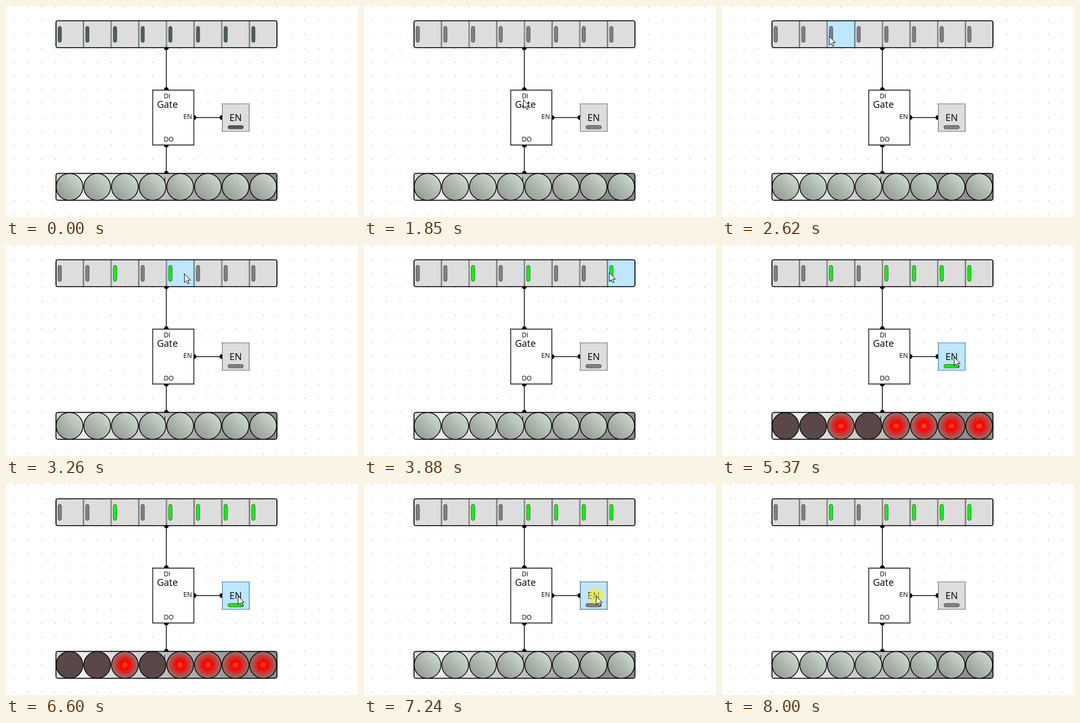
An HTML page with a canvas that plays this animation: 668 px wide and 400 px high, repeating every 8.56 s.

```html
<!DOCTYPE html>
<html lang="en">
<head>
<meta charset="utf-8">
<title>Gate with enable input</title>
<style>
html, body { margin: 0; overflow: hidden; background: #fff; }
canvas { display: block; }
</style>
</head>
<body>
<canvas id="stage" width="668" height="400"></canvas>
<script>
const ctx = document.getElementById('stage').getContext('2d');
const LOOP = 8560, ENTER = 1460, LEAVE = 8000, STEP = 78, HOLD = 60;
const GRID = 26.25, PITCH = 2 * GRID, BAR_X = 94.5, EN = 8;

// Pointer stops: arrival, departure, x, y
const stops = [
  [ENTER, ENTER, 535, 272], [1620, 1620, 165, 141], [2003, 2003, 393, 201],
  [2540, 2720, 203, 57], [2875, 2875, 268, 85], [3030, 3300, 338, 54],
  [3490, 3728, 488, 56], [3960, 4190, 453, 50], [4430, 4690, 383, 49],
  [4890, 7840, 439.5, 212], [7920, LEAVE, 463, 238]
];
const presses = [2650, 3200, 3585, 4045, 4615, 5145, 6625, 7240, 7640];

function pointerAt(t) {
  if (t < ENTER || t >= LEAVE) return null;
  const s = t - (t - ENTER) % STEP;
  const i = stops.findLastIndex(p => p[0] <= s);
  const [, leave, x, y] = stops[i];
  const [arrive, , nx, ny] = stops[i + 1] || stops[i];
  const k = s > leave ? (s - leave) / (arrive - leave) : 0;
  return { x: Math.round(x + k * (nx - x)), y: Math.round(y + k * (ny - y)) };
}

function buttonUnder(p) {
  if (!p) return -1;
  if (p.y >= 28 && p.y < 79 && p.x > 95 && p.x < 514) return Math.floor((p.x - BAR_X) / PITCH);
  return p.x >= 410 && p.x < 462 && p.y >= 185 && p.y < 238 ? EN : -1;
}

const clicks = presses.map(at => ({ at, button: buttonUnder(pointerAt(at)) }));

function box(x, y, w, h, r, fill, stroke, width = 1) {
  ctx.beginPath();
  ctx.roundRect(x, y, w, h, r);
  if (fill) { ctx.fillStyle = fill; ctx.fill(); }
  if (stroke) { ctx.strokeStyle = stroke; ctx.lineWidth = width; ctx.stroke(); }
}

function disc(x, y, r, fill, stroke) {
  ctx.beginPath();
  ctx.arc(x, y, r, 0, 2 * Math.PI);
  ctx.fillStyle = fill;
  ctx.fill();
  if (stroke) { ctx.strokeStyle = stroke; ctx.lineWidth = 1.5; ctx.stroke(); }
}

function line(x0, y0, x1, y1, width = 1.5) {
  ctx.beginPath();
  ctx.moveTo(x0, y0);
  ctx.lineTo(x1, y1);
  ctx.strokeStyle = '#000';
  ctx.lineWidth = width;
  ctx.stroke();
}

function wire(x0, y0, x1, y1) {
  line(x0, y0, x1, y1);
  disc(x0, y0, 4.4, '#000');
  disc(x1, y1, 4.4, '#000');
}

function text(s, x, y, size) {
  ctx.font = size + 'px "Open Sans", "Noto Sans", sans-serif';
  ctx.fillStyle = '#000';
  ctx.fillText(s, x, y);
}

function blend(gradient, ...stops) {
  stops.forEach(([at, color]) => gradient.addColorStop(at, color));
  return gradient;
}

function grid() {
  ctx.fillStyle = '#555';
  for (let x = 15.25; x < 668; x += GRID)
    for (let y = 1; y < 400; y += GRID)
      ctx.fillRect(x, y, 1, 1);
}

function buttonColors(i, hot, pressed) {
  if (i !== hot) return ['#ddd', '#707070'];
  return pressed ? ['#c4e5f6', '#2c628b'] : ['#bee6fd', '#3c7fb1'];
}

function led(x, y, w, h, on, idle) {
  box(x, y, w, h, 3.5, idle ? '#4a6050' : on ? '#0cf80c' : '#808080', '#555');
}

function switches(isOn, hot, pressed, idle) {
  for (let i = 0; i < 8; i++) {
    const x = BAR_X + i * PITCH;
    const [fill, edge] = buttonColors(i, hot, pressed);
    box(x + .7, 28.5, PITCH - 1.4, 50, 1, fill, edge, 1.2);
    led(x + 4.2, 38.5, 6.5, 30.5, isOn(i), idle);
  }
  box(BAR_X + .3, 28, 419.5, 51, 4, null, '#000', 1.7);
}

function lamps(enabled, isOn) {
  const metal = blend(ctx.createLinearGradient(95, 317, 514, 369),
    [0, '#d4d4d4'], [.12, '#eee'], [.85, '#909090'], [1, '#8c8c8c']);
  box(BAR_X + .3, 317.4, 419.5, 51, 4, metal, '#000', 1.7);
  line(301.5, 324, 301.5, 334, 1);
  for (let i = 0; i < 8; i++) {
    const x = BAR_X + (i + .5) * PITCH - .2, y = 343;
    let fill = '#5a4848';
    if (!enabled)
      fill = blend(ctx.createLinearGradient(x + 18, y - 18, x - 18, y + 18), [0, '#c8d8c8'], [1, '#969c96']);
    else if (isOn(i))
      fill = blend(ctx.createRadialGradient(x, y, 0, x, y, 26),
        [0, '#ff4a18'], [.16, '#ff4014'], [.21, '#ff0808'], [.32, '#fa0404'], [1, '#8a7a74']);
    disc(x, y, 25.4, fill, '#000');
  }
}

function gate() {
  box(278.5, 159.5, 78, 104, 0, '#fff', '#000', 1.4);
  text('DI', 299.5, 175, 12.5);
  text('Gate', 286.5, 193, 18);
  text('EN', 336.5, 214, 12.5);
  text('DO', 299.5, 257, 12.5);
}

function enableButton(on, hot, pressed, idle) {
  const [fill, edge] = buttonColors(EN, hot, pressed);
  box(410.5, 185.5, 51, 52, 0, fill, edge, 1.2);
  text('EN', 424, 218, 18);
  led(421, 226.5, 29.5, 6.5, on, idle);
}

const arrowShape = new Path2D('M0 0V16.5L3.8 13L6.6 19L9 18L6.4 12H11.6Z');
function arrow({ x, y }) {
  ctx.save();
  ctx.translate(x + .5, y + .5);
  ctx.fillStyle = '#fff';
  ctx.fill(arrowShape);
  ctx.strokeStyle = '#000';
  ctx.lineWidth = 1;
  ctx.stroke(arrowShape);
  ctx.restore();
}

function draw(t) {
  const isOn = i => clicks.filter(c => c.button === i && t >= c.at + HOLD).length % 2 === 1;
  const pressed = clicks.some(c => t >= c.at && t < c.at + HOLD);
  const pointer = pointerAt(t), hot = buttonUnder(pointer), idle = t < 1160;
  ctx.fillStyle = '#fff';
  ctx.fillRect(0, 0, 668, 400);
  grid();
  wire(304.3, 79.5, 304.3, 158.5);
  wire(304.3, 264, 304.3, 317);
  wire(357, 211.5, 409.5, 211.5);
  switches(isOn, hot, pressed, idle);
  gate();
  enableButton(isOn(EN), hot, pressed, idle);
  lamps(isOn(EN), isOn);
  if (pressed) disc(pointer.x, pointer.y + 1, 14.5, 'rgba(250,240,30,.62)');
  if (pointer) arrow(pointer);
}

const start = performance.now();
function frame() {
  draw((performance.now() - start) % LOOP);
  requestAnimationFrame(frame);
}
frame();
</script>
</body>
</html>
```
